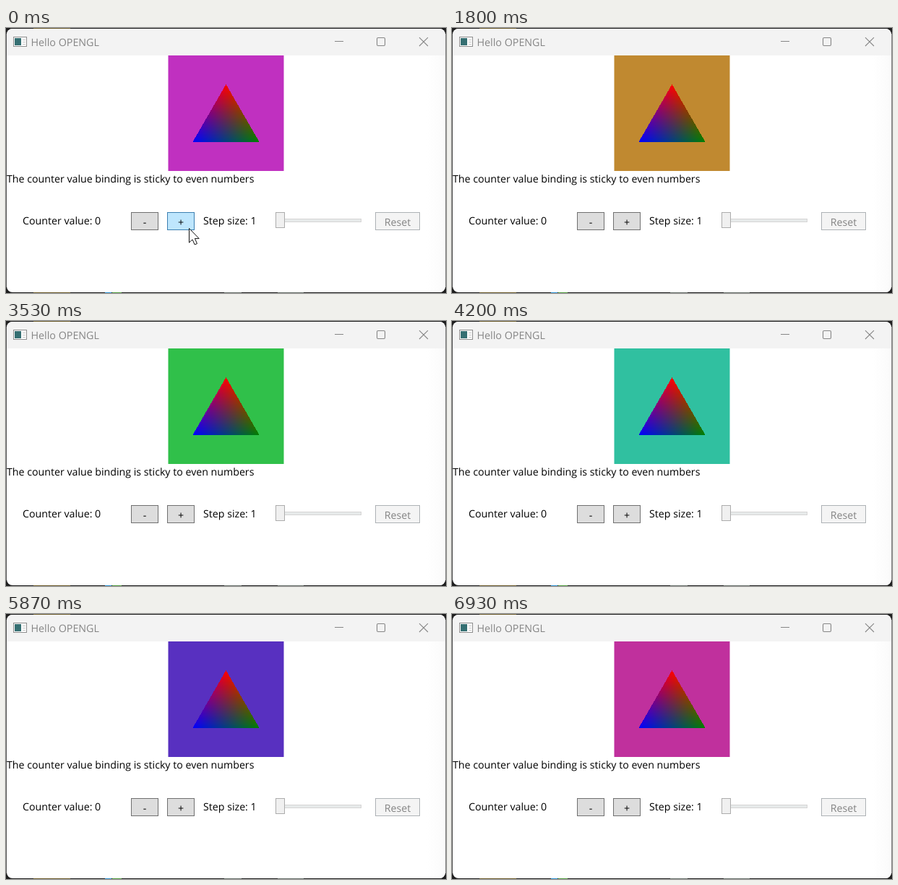
Animation, 609 px wide and 367 px high, one loop 6990 ms. Source, as an HTML page with a canvas:

```html
<!DOCTYPE html>
<html lang="en">
<head>
<meta charset="utf-8">
<title>Hello OPENGL</title>
<style>
  html, body { margin: 0; width: 100%; height: 100%; overflow: hidden; background: #1e1e1e; }
  #stage { position: absolute; left: 0; top: 0; width: 609px; height: 367px; overflow: hidden; }
  svg { position: absolute; left: 0; top: 0; display: block; }
  canvas { position: absolute; left: 224px; top: 38px; }
  text { font: 14.2px "Open Sans", "Noto Sans", sans-serif; fill: #000; text-rendering: geometricPrecision; }
  .mid { text-anchor: middle; }
  .btn { fill: #ddd; stroke: #707070; }
  .btn.hover { fill: #bee6fd; stroke: #3c7fb1; }
  .off { fill: #f4f4f4; stroke: #adb2b5; }
  .chrome { fill: none; stroke: #868686; stroke-width: 1.1; }
</style>
</head>
<body>
<div id="stage">
  <svg width="609" height="367" viewBox="0 0 609 367">
    <defs>
      <linearGradient id="shade">
        <stop offset="0" stop-color="#fff"/>
        <stop offset="1" stop-color="#fafafa"/>
      </linearGradient>
      <clipPath id="frame"><rect x="1" y="1" width="607" height="365" rx="8"/></clipPath>
    </defs>

    <!-- desktop showing behind the window -->
    <rect width="609" height="367" fill="#1e1e1e"/>
    <path d="M38 366.5H89M38 .5H89" stroke="#6b5a2a"/>
    <path d="M137 366.5H146" stroke="#2b8fd0"/>
    <path d="M147 366.5H160" stroke="#4f9a3c"/>
    <path d="M302 366.5H326M376 366.5H412" stroke="#68706a"/>
    <path d="M608.5 8V359" stroke="#8a8a8a"/>
    <path d="M.5 8V359" stroke="#555"/>

    <!-- window -->
    <g clip-path="url(#frame)">
      <rect width="609" height="367" fill="#fff"/>
      <rect x="582" y="38" width="27" height="329" fill="url(#shade)"/>
      <rect width="609" height="38" fill="#f3f3f3"/>
    </g>
    <rect x="10.5" y="12.5" width="18" height="13" fill="#fff" stroke="#8d8d8d"/>
    <rect x="12" y="14" width="9" height="10" fill="#356f72"/>
    <path d="M23 16.5H27M23 19.5H27M23 22.5H27" stroke="#c4c4c4"/>
    <text x="34.5" y="25" style="font-size:14.3px;fill:#868686">Hello OPENGL</text>
    <path class="chrome" d="M455 18.5H467M572 13.2L584 25M584 13.2L572 25"/>
    <rect class="chrome" x="513.5" y="13.5" width="11" height="11" rx="1.5"/>

    <rect id="view" x="224.5" y="38" width="160" height="160"/>
    <text x="1" y="214">The counter value binding is sticky to even numbers</text>

    <!-- controls -->
    <text x="23" y="272">Counter value: 0</text>
    <rect class="btn" x="173.5" y="255.5" width="37" height="24"/>
    <text class="mid" x="192" y="274">-</text>
    <rect class="btn" id="plus" x="223.5" y="255.5" width="37" height="24"/>
    <text class="mid" x="242" y="274">+</text>
    <text x="273" y="272">Step size: 1</text>
    <rect x="374.5" y="264.5" width="117" height="4" fill="#e7eaea" stroke="#d6d6d6"/>
    <rect x="373.5" y="255.5" width="12" height="21" fill="#f0f0f0" stroke="#acacac"/>
    <rect class="off" x="511.5" y="255.5" width="61" height="24"/>
    <text class="mid" x="542" y="274" style="fill:#838383">Reset</text>
  </svg>

  <canvas id="tri" width="161" height="160"></canvas>

  <svg width="609" height="367" viewBox="0 0 609 367">
    <path id="cursor" d="M.5 .5V20.2L5 16L8.2 23L11.5 21.6L8.4 14.6H14.2Z"
          fill="#fff" stroke="#111" stroke-linejoin="round"/>
  </svg>
</div>
<script>
  const LOOP = 6990, STEP = 200 / 3;
  const HUE_START = 300, HUE_STEP = 3.6;
  const EXIT_STEPS = 7;
  const $ = id => document.getElementById(id);
  const view = $('view'), plus = $('plus'), cursor = $('cursor');

  // Hard-edged triangle with colours blended between its corners.
  function drawTriangle() {
    const ctx = $('tri').getContext('2d');
    const img = ctx.createImageData(161, 160);
    const mid = 80.5, top = 40, height = 80, half = height / Math.sqrt(3);
    for (let y = top; y < top + height; y++) {
      for (let x = 0; x < 161; x++) {
        const down = (y + .5 - top) / height;
        const side = (x + .5 - mid) / half;
        const left = (down - side) / 2, right = (down + side) / 2;
        if (left < 0 || right < 0) continue;
        img.data.set([255 * (1 - down), 128 * right, 255 * left, 255], (y * 161 + x) * 4);
      }
    }
    ctx.putImageData(img, 0, 0);
  }

  function render(time) {
    const n = Math.floor((time % LOOP + 5) / STEP);
    view.setAttribute('fill', `hsl(${(HUE_START + n * HUE_STEP) % 360}, 60%, 47%)`);

    const p = Math.pow(Math.min(n / EXIT_STEPS, 1), 1.5);
    const x = 253 - 109 * p, y = 277 + 89 * p;
    cursor.setAttribute('transform', `translate(${Math.round(x)} ${Math.round(y)})`);
    cursor.style.display = n > EXIT_STEPS ? 'none' : '';
    plus.classList.toggle('hover', y < 280);
  }

  drawTriangle();
  const start = performance.now();
  function tick() {
    render(performance.now() - start);
    requestAnimationFrame(tick);
  }
  tick();
</script>
</body>
</html>
```
